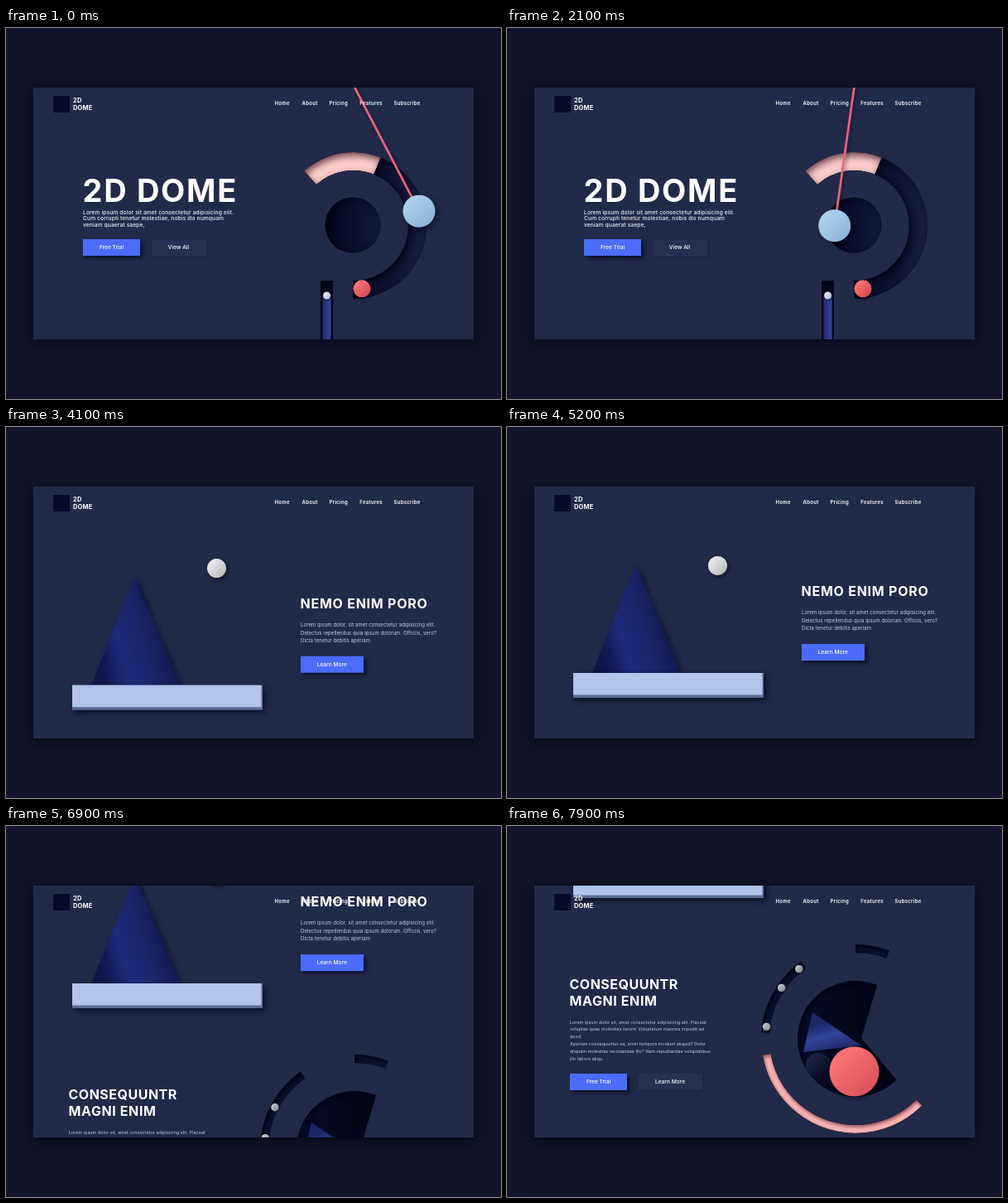
Animation, 598 px wide and 448 px high, one loop 8000 ms. Source, as an HTML page with a canvas:

```html
<!DOCTYPE html>
<html lang="en">
<head>
<meta charset="utf-8">
<title>2D DOME</title>
<style>
  html, body { margin: 0; width: 598px; height: 448px; overflow: hidden; background: #11142a; }
  body { position: relative; font-family: Inter, "Open Sans", sans-serif; color: #fff; }
  canvas, .layer, .section { position: absolute; left: 0; top: 0; width: 598px; height: 448px; }
  .layer { overflow: hidden; clip-path: inset(72px 33px); }
  .line { position: absolute; line-height: 0; white-space: nowrap; }
  .button {
    position: absolute; display: flex; align-items: center; justify-content: center;
    font-size: 6.6px; font-weight: 500; background: #273052;
    box-shadow: 1px 1px 3px rgba(10, 13, 35, .3);
  }
  .button.main { background: #4b6cf8; box-shadow: 3px 3px 5px rgba(5, 7, 25, .75); }
</style>
</head>
<body>
<canvas id="art" width="598" height="448"></canvas>
<div class="layer" id="page"></div>
<div class="layer" id="nav"></div>
<script>
const ctx = document.getElementById('art').getContext('2d');
const page = document.getElementById('page');
const nav = document.getElementById('nav');
const LOOP = 8000;
const TAU = Math.PI * 2;
const rad = deg => deg * Math.PI / 180;
const clamp = v => Math.max(0, Math.min(1, v));
const wave = u => (1 - Math.cos(Math.PI * u)) / 2;
const ease = (t, start, length) => wave(clamp((t - start) / length));

// ---------- text ----------
function add(parent, className, style, text = '') {
  const el = document.createElement('div');
  el.className = className;
  Object.assign(el.style, style);
  el.textContent = text;
  parent.append(el);
  return el;
}

// y is the middle of the capital letters
function line(parent, x, y, text, size, weight, spacing, color = '#fff') {
  add(parent, 'line', {
    left: x + 'px', top: y + 'px', fontSize: size + 'px',
    fontWeight: weight, letterSpacing: spacing + 'px', color
  }, text);
}

function paragraph(parent, x, y, step, size, weight, spacing, color, lines) {
  lines.forEach((text, i) => line(parent, x, y + i * step, text, size, weight, spacing, color));
}

function button(parent, x, y, w, h, text, main) {
  add(parent, main ? 'button main' : 'button', {
    left: x + 'px', top: y + 'px', width: w + 'px', height: h + 'px'
  }, text);
}

const TOPS = [0, 360, 600];
const sections = TOPS.map(() => add(page, 'section', {}));
const [hero, cone, rings] = sections;

line(hero, 92.5, 195.7, '2D DOME', 38, 700, 1.7);
paragraph(hero, 93, 222.5, 7.7, 6.7, 500, 0.1, '#eceef5', [
  'Lorem ipsum dolor sit amet consectetur adipisicing elit.',
  'Cum corrupti tenetur molestiae, nobis illo numquam',
  'veniam quaerat saepe,'
]);
button(hero, 93, 255, 69, 20, 'Free Trial', true);
button(hero, 175.5, 255, 66, 20.5, 'View All');

line(cone, 355.5, 198, 'NEMO ENIM PORO', 16, 700, 0.75);
paragraph(cone, 356, 224, 9.6, 6, 400, 0.08, '#c9cddb', [
  'Lorem ipsum dolor, sit amet consectetur adipisicing elit.',
  'Delectus repellendus quia ipsum dolorum. Officiis, vero?',
  'Dicta tenetur debitis aperiam'
]);
button(cone, 355.5, 262, 76.5, 19.5, 'Learn More', true);

line(rings, 75.5, 191, 'CONSEQUUNTR', 16, 700, 0.5);
line(rings, 75.5, 211, 'MAGNI ENIM', 16, 700, 0.6);
paragraph(rings, 76, 236.5, 8.8, 5.3, 400, 0.08, '#c9cddb', [
  'Lorem ipsum dolor sit, amet consectetur adipisicing elit. Placeat',
  'voluptas quae molestias rerum! Voluptatum maiores impedit ad',
  'quod,',
  'Aperiam consequuntur ea, enim tempora incidunt aliquid? Dolor',
  'aliquam molestias recusandae illo? Nam repudiandae voluptatibus',
  'illo labore aliqu'
]);
button(rings, 76, 299, 69, 19.5, 'Free Trial', true);
button(rings, 158, 299, 78, 19.5, 'Learn More');

add(nav, 'mark', { position: 'absolute', left: '57px', top: '82px', width: '20px', height: '20px', background: '#070a28' });
line(nav, 81, 88, '2D', 7.5, 700, 0.2);
line(nav, 81, 97.3, 'DOME', 7.5, 700, 0.2);
[['Home', 324.5], ['About', 357.5], ['Pricing', 390.5], ['Features', 427.3], ['Subscribe', 468.5]]
  .forEach(([text, x]) => line(nav, x, 91.2, text, 6, 600, 0.3));

// ---------- shapes ----------
function linear(x0, y0, x1, y1, ...colors) {
  const g = ctx.createLinearGradient(x0, y0, x1, y1);
  colors.forEach((c, i) => g.addColorStop(i / (colors.length - 1), c));
  return g;
}

function shadow(color, blur, dx, dy) {
  ctx.shadowColor = color;
  ctx.shadowBlur = blur;
  ctx.shadowOffsetX = dx;
  ctx.shadowOffsetY = dy;
}

function raised(path, fill, blur = 6, dx = 3, dy = 3, color = 'rgba(3,5,22,.6)') {
  ctx.save();
  shadow(color, blur, dx, dy);
  ctx.fillStyle = fill;
  ctx.fill(path);
  ctx.restore();
}

// fills the path and drops a shadow from its edge inwards
function sunken(path, fill, blur, dx, dy, color = 'rgba(0,0,18,.85)') {
  ctx.save();
  ctx.clip(path);
  ctx.fillStyle = fill;
  ctx.fill(path);
  const outside = new Path2D();
  outside.rect(-400, -900, 1400, 2400);
  outside.addPath(path);
  shadow(color, blur, dx, dy);
  ctx.fillStyle = '#000';
  ctx.fill(outside, 'evenodd');
  ctx.restore();
}

function circle(x, y, r) {
  const p = new Path2D();
  p.arc(x, y, r, 0, TAU);
  return p;
}

function ring(x, y, inner, outer, from, to) {
  const p = new Path2D();
  p.arc(x, y, outer, rad(from), rad(to));
  p.arc(x, y, inner, rad(to), rad(from), true);
  p.closePath();
  return p;
}

function rect(x, y, w, h) {
  const p = new Path2D();
  p.rect(x, y, w, h);
  return p;
}

function polygon(...points) {
  const p = new Path2D();
  points.forEach(([x, y]) => p.lineTo(x, y));
  p.closePath();
  return p;
}

function ball(x, y, r, light, dark, blur, offset) {
  raised(circle(x, y, r), linear(x - r * 0.7, y - r * 0.7, x + r * 0.7, y + r * 0.7, light, dark), blur, offset, offset);
}

function drawHero(t) {
  const x = 419.5, y = 238.5;
  sunken(ring(x, y, 66.5, 88.5, 292, 450), linear(x, 0, x + 88, 0, '#05071f', '#181e43'), 11, 4, 3);
  sunken(ring(x, y, 66.5, 88.5, 228, 292), '#fbccc8', 8, 1, 4, 'rgba(50,15,30,.75)');
  sunken(circle(419, 238, 33.5), linear(386, 0, 453, 0, '#03051e', '#121a3c'), 12, 4, 1);

  sunken(rect(380, 305, 15, 101), '#05071f', 5, 2, 2);
  ctx.fillStyle = linear(382.5, 0, 392.5, 0, '#202b70', '#36479a');
  ctx.fillRect(382.5, 323, 10, 83);
  ball(387.6, 323, 4.5, '#e4e9f6', '#b9c3de', 3, 1);
  ball(430, 314.8, 10.5, '#fb7577', '#d84c56', 5, 2);

  const a = rad(32) * Math.cos(TAU * t / 3365 + 0.535);
  const px = 419.8, py = 69, length = 171.5;
  const bx = px + length * Math.sin(a), by = py + length * Math.cos(a);
  ctx.save();
  shadow('rgba(3,5,22,.4)', 4, 2, 2);
  ctx.strokeStyle = '#ee647a';
  ctx.lineWidth = 2.7;
  ctx.beginPath();
  ctx.moveTo(px, py);
  ctx.lineTo(bx, by);
  ctx.stroke();
  ctx.restore();
  ball(bx, by, 19.5, '#aed2ee', '#8cb6d9', 8, 3);
}

function drawCone(t) {
  raised(polygon([155.5, 166], [210, 297], [103, 297]),
    linear(112, 270, 196, 244, '#0e1548', '#1d2b7b', '#1a2669', '#111950'), 7, 3, 2);

  raised(rect(80, 297, 230, 30), '#5c6b93', 7, 3, 3, 'rgba(3,5,22,.8)');
  ctx.fillStyle = '#b1c5eb';
  ctx.fillRect(80, 297, 228.5, 26.5);

  const u = (t - 6400) / 850;
  const k = u - 2 * Math.floor(u / 2) - 1;
  ball(254.5, 285.5 - 142 * (1 - k * k), 11.5, '#ececec', '#bdbdbf', 5, 2);
}

function drawRings(t) {
  const x = 421, y = 257;
  sunken(ring(x, y, 104, 114, 184, 235), '#0c1131', 6, 3, 3);
  sunken(ring(x, y, 104, 114, 270, 291), '#0c1131', 6, 3, 3);
  sunken(ring(x, y, 104, 114, 45, 170), '#fcb9b7', 5, 1, 2, 'rgba(90,20,35,.75)');

  [6090, 6920, 7760].forEach(start => {
    const a = rad(187 + 44.5 * wave(Math.max(0, (t - start) / 1700)));
    ball(x + 108.5 * Math.cos(a), y + 108.5 * Math.sin(a), 4.7, '#c9c9cb', '#8b8b90', 3, 1);
  });

  const disc = new Path2D();
  disc.moveTo(428, 256);
  disc.arc(x, y, 70, rad(45), rad(292));
  disc.closePath();
  sunken(disc, linear(352, 0, 470, 0, '#070a28', '#02030f'), 8, 3, 3);

  ctx.save();
  ctx.clip(disc);
  raised(polygon([369, 225], [428, 265], [358, 273]),
    linear(385, 236, 394, 270, '#1b2664', '#33449a', '#202c70'), 5, 2, 2);
  ball(376, 289, 15, '#1c2547', '#070a22', 5, 2);
  ctx.restore();
  ball(419.5, 296.5, 30, '#fb7477', '#d9545c', 7, 2);
}

const painters = [drawHero, drawCone, drawRings];

function render(t) {
  const scroll = 360 * ease(t, 3100, 1150) + 240 * ease(t, 6380, 1120);

  ctx.fillStyle = '#11142a';
  ctx.fillRect(0, 0, 598, 448);
  raised(rect(33, 72, 532, 304), '#222a4a', 12, 0, 3, 'rgba(3,5,18,.75)');

  ctx.save();
  ctx.clip(rect(33, 72, 532, 304));
  TOPS.forEach((top, i) => {
    const shift = top - scroll;
    sections[i].style.transform = `translateY(${shift}px)`;
    if (Math.abs(shift) > 420) return;
    ctx.save();
    ctx.translate(0, shift);
    painters[i](t);
    ctx.restore();
  });
  ctx.restore();
}

const begin = performance.now();
function tick() {
  render((performance.now() - begin) % LOOP);
  requestAnimationFrame(tick);
}
tick();
</script>
</body>
</html>
```
